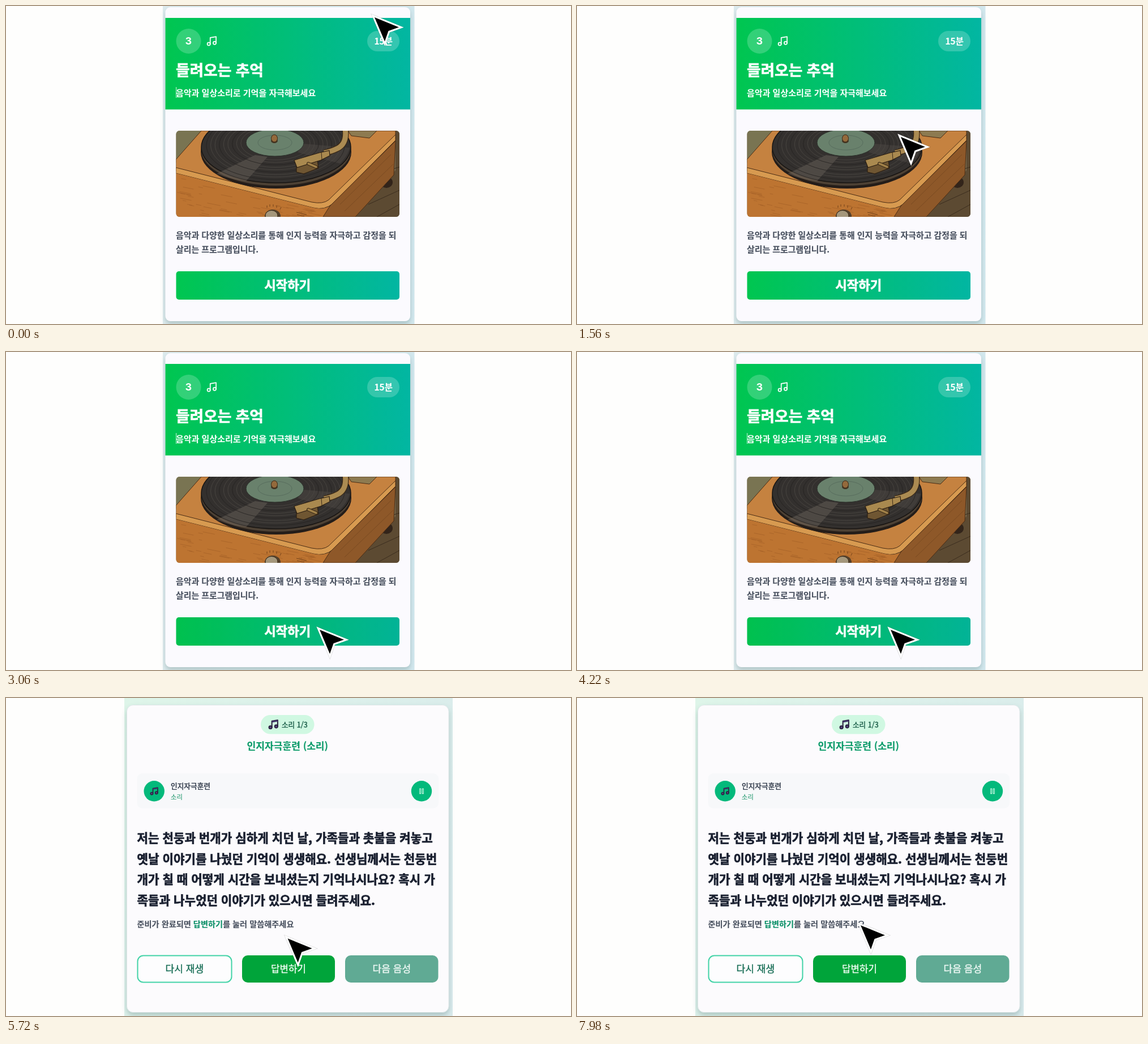
An HTML page for the animation above (8000 ms loop, 998 px wide and 561 px high).

```html
<!DOCTYPE html>
<html lang="ko">
<head>
<meta charset="utf-8">
<title>인지자극훈련</title>
<style>
html, body { margin: 0; width: 100%; height: 100%; overflow: hidden; background: #fefefd; }
svg { display: block; width: 100vw; height: 100vh; }
text { font-family: "Noto Sans CJK KR", "Noto Sans CJK", "Noto Sans", sans-serif; white-space: pre; }
</style>
</head>
<body>
<svg id="stage" viewBox="0 0 998 561" xmlns="http://www.w3.org/2000/svg"></svg>
<script>
const LOOP = 8000, CUT = 4250, PLAYING = 5400;
const stage = document.getElementById('stage');

// Extra outline for weights the font lacks.
const EMBOLDEN = { 400: 0.2, 500: 0.4, 700: 0.15, 900: 0.7 };

// Text placed by the vertical middle of its Hangul glyphs.
const text = (x, y, size, fill, weight, str, anchor = 'start') =>
  `<text x="${x}" y="${y + size * 0.38}" font-size="${size}" fill="${fill}" stroke="${fill}" stroke-width="${EMBOLDEN[weight]}" font-weight="${weight}" text-anchor="${anchor}">${str}</text>`;
const rect = (x, y, w, h, r, fill, more = '') =>
  `<rect x="${x}" y="${y}" width="${w}" height="${h}" rx="${r}" fill="${fill}" ${more}/>`;
const path = (d, fill, stroke = 'none', width = 1, more = '') =>
  `<path d="${d}" fill="${fill}" stroke="${stroke}" stroke-width="${width}" ${more}/>`;
const oval = (x, y, rx, ry, fill, more = '') =>
  `<ellipse cx="${x}" cy="${y}" rx="${rx}" ry="${ry}" fill="${fill}" ${more}/>`;
const note = (x, y, s, color, fill, width) =>
  `<g transform="translate(${x} ${y}) scale(${s})" fill="${fill}" stroke="${color}" stroke-width="${width}" stroke-linejoin="round" stroke-linecap="round">
    <path d="M9 18V5l12-2v13" fill="none"/><circle cx="6" cy="18" r="3"/><circle cx="18" cy="16" r="3"/></g>`;
const darkNote = (x, y, s) => note(x, y, s, '#2b2340', '#5b4a8c', 2.4) +
  path(`M${x + 9 * s} ${y + 6.5 * s}l${12 * s} ${-2 * s}`, 'none', '#40346a', 3 * s);

function rng(seed) {
  return () => (seed = (seed * 16807) % 2147483647) / 2147483647;
}

function grain() {
  const rnd = rng(41);
  let d = '';
  for (let i = 0; i < 60; i++) {
    const x = 302 + rnd() * 240, top = 300 + (x - 300) * 0.25;
    const y = top + rnd() * (372 - top), len = 5 + rnd() * 20;
    d += `M${x.toFixed(1)} ${y.toFixed(1)}l${len.toFixed(1)} ${(len * 0.2).toFixed(1)}`;
  }
  return path(d, 'none', '#8a4d1d', 0.8, 'opacity=".45"');
}

function turntable() {
  const edge = '#4a2c14';
  let rings = '';
  for (let i = 0; i < 9; i++)
    rings += oval(476, 246 - i * 0.5, 122 - i * 7.6, 60 - i * 3.8, 'none', `stroke="${i % 3 ? '#4d4945' : '#242120'}" stroke-width=".8"`);
  return `<g clip-path="url(#photo)">` +
    rect(300, 220, 395, 152, 0, '#77694c') +
    path('M300 220H352L300 277Z', '#797452') +
    path('M688 220H695V372H610L688 290Z', '#5c4a32') +
    path('M640 350L695 325M655 372L695 350M675 290L695 284', 'none', '#3b2d1e', 1) +
    oval(672, 311, 11, 10, '#32241a') +
    path('M345 220H688V235L575 348Q562 358 545 353L300 291V271Z', '#c58240', edge, 1) +
    path('M300 285L540 346Q560 350 570 342L688 227V237L578 348Q563 361 543 356L300 295Z', '#d79a50', edge, 1) +
    path('M300 295L543 356Q560 360 572 353V372H300Z', '#bd7431') +
    path('M572 353L688 238L685 298L617 372H560Z', '#8e5829', edge, 1) +
    path('M590 350L680 262M598 362L684 279', 'none', '#6d411d', 1, 'opacity=".6"') +
    grain() +
    path('M604 220H655L642 233L610 229Z', '#8d7a50', edge, 1) +
    oval(477, 258, 133, 64, '#241d19') +
    oval(477, 254, 132, 63, '#4d4134') +
    oval(477, 249, 132, 63, '#33302e', 'stroke="#171412" stroke-width="1.5"') +
    path('M440 263L372 296Q396 306 424 309L462 266Z', '#8b8378', 'none', 0, 'opacity=".3"') +
    path('M515 258L590 278Q604 264 607 250L526 243Z', '#8b8378', 'none', 0, 'opacity=".15"') +
    rings +
    oval(475, 241, 51, 24, '#69816c', 'stroke="#2c312b"') +
    oval(475, 241, 30, 13, 'none', 'stroke="#53685a" stroke-width=".8"') +
    oval(474, 238, 6, 4, '#443725') +
    oval(474, 233.5, 5.5, 6.5, '#946a3c', 'stroke="#3a2614"') +
    ['#3b2a18', '#ab8b52'].map((c, i) =>
      path('M599 216Q603 242 586 251Q574 257 562 259', 'none', c, i ? 9 : 11.5)).join('') +
    path('M513 280L550 272L552 286L526 296L513 293Z', '#6f5632', '#2b1e12', 1.2) +
    path('M509 272L553 259L571 255L572 264L556 272L514 285Z', '#a9894f', '#2b1e12', 1.2) +
    path('M557 258L558 271', 'none', '#3b2a18', 1) +
    path('M534 278L548 284', 'none', '#3b2a18', 6, 'stroke-linecap="round"') +
    path('M534 278L548 284', 'none', '#a08048', 3.6, 'stroke-linecap="round"') +
    path('M461 356v-4M466 354v-4M472 354v-4M478 356v-4M484 359l2-4', 'none', '#75431a', 1) +
    path('M513 364l18 4M514 368l13 3', 'none', '#75431a', 1) +
    oval(471, 371, 14, 12, '#54402a') +
    oval(469, 370, 11, 9.5, '#a4977c', 'stroke="#392918"') +
    `</g>`;
}

function menuCard() {
  const dark = '#49515f';
  return rect(277, 0, 444.5, 561, 0, 'url(#strip1)') +
    rect(281.5, 2, 432.5, 554, 9, '#fbfafe', 'filter="url(#soft)"') +
    rect(281.5, 21, 432.5, 161.5, 0, 'url(#green)') +
    `<circle cx="322.5" cy="62" r="22" fill="#fff" opacity=".2"/>` +
    `<text x="322.3" y="68.3" font-size="18" font-weight="700" fill="#fff" text-anchor="middle" style="font-family:Inter,sans-serif">3</text>` +
    note(353, 51.5, 0.86, '#fff', 'none', 2) +
    rect(638, 44, 57, 36, 18, '#fff', 'opacity=".2"') +
    text(666.7, 62.3, 15.4, '#fff', 700, '15분', 'middle') +
    text(300, 113, 26.7, '#fff', 900, '들려오는 추억') +
    text(300, 153, 15, '#f3fff8', 700, '음악과 일상소리로 기억을 자극해보세요') +
    `<path id="caret" d="M300.7 143V162" stroke="#d5f5e4" stroke-width="1"/>` +
    turntable() +
    text(300, 404.5, 14.9, dark, 700, '음악과 다양한 일상소리를 통해 인지 능력을 자극하고 감정을 되') +
    text(300, 429.5, 14.9, dark, 700, '살리는 프로그램입니다.') +
    rect(300.5, 468, 394.5, 50, 5, 'url(#green)') +
    rect(300.5, 468, 394.5, 50, 5, '#009a45', 'id="startHover" opacity=".12"') +
    text(497.3, 493, 22.3, '#fff', 900, '시작하기', 'middle');
}

function trainingCard() {
  const lines = [
    '저는 천둥과 번개가 심하게 치던 날, 가족들과 촛불을 켜놓고',
    '옛날 이야기를 나눴던 기억이 생생해요. 선생님께서는 천둥번',
    '개가 칠 때 어떻게 시간을 보내셨는지 기억나시나요? 혹시 가',
    '족들과 나누었던 이야기가 있으시면 들려주세요.'
  ];
  return rect(209, 0, 580, 561, 0, 'url(#strip2)') +
    rect(213.5, 12.5, 568.5, 542, 11, '#fcfbfd', 'filter="url(#soft)" stroke="#dfe7e8" stroke-width="1"') +
    rect(450, 30, 94.5, 33.5, 16.75, '#d0f8e2') +
    darkNote(462, 36.5, 0.85) +
    text(487, 47.3, 12.6, '#1c5f4a', 500, '소리 1/3') +
    text(497.3, 85, 17.1, '#0b9b69', 700, '인지자극훈련 (소리)', 'middle') +
    rect(231.5, 133, 532.5, 61.5, 9, '#f7f8fa') +
    `<circle cx="261.7" cy="164.3" r="18.2" fill="#04b97b"/>` + darkNote(253.2, 156, 0.7) +
    text(291, 155.3, 12.7, '#263040', 500, '인지자극훈련') +
    text(291, 174.5, 11.3, '#38a27d', 400, '소리') +
    `<circle cx="734" cy="164.3" r="18.2" fill="#04b97b"/>` +
    path('M730.5 159.8L738.6 164.3L730.5 168.8Z', 'none', '#dcfff0', 1.2, 'id="play" stroke-linejoin="round"') +
    path('M730.7 160h2v8.6h-2zM735.3 160h2v8.6h-2z', 'none', '#c8f7e3', 1.1, 'id="pause"') +
    lines.map((s, i) => text(231.5, 247 + i * 36.6, 21.2, '#1a2030', 900, s)).join('') +
    text(231.5, 398.5, 14.2, '#4a5260', 700,
      '준비가 완료되면 <tspan fill="#0b9068" stroke="#0b9068">답변하기</tspan>를 눌러 말씀해주세요') +
    rect(232.5, 454.5, 166, 47, 10, '#fdfdfe', 'stroke="#43d3a7" stroke-width="2"') +
    text(315.3, 477.7, 17.1, '#1d715a', 500, '다시 재생', 'middle') +
    rect(417, 454, 164, 48, 10, '#00a43a', 'id="answer"') +
    text(499, 477.7, 16.8, '#f2fff5', 500, '답변하기', 'middle') +
    rect(599, 454, 164.5, 48, 10, '#60aa94') +
    text(681.3, 477.7, 17.1, '#edf8f4', 500, '다음 음성', 'middle');
}

const linear = (id, a, b, more = '') =>
  `<linearGradient id="${id}" ${more}><stop stop-color="${a}"/><stop offset="1" stop-color="${b}"/></linearGradient>`;
const arrow = 'M5 6L48 23.5L29.5 30L23 48.5Z';

stage.innerHTML = `<defs>
  ${linear('green', '#00c650', '#02b6a2')}
  ${linear('strip1', '#deebee', '#d3e8ee')}
  ${linear('strip2', '#def5e9', '#d9eaec', 'x2="1" y2=".6"')}
  <clipPath id="photo"><rect x="300.5" y="220" width="394.5" height="152" rx="6"/></clipPath>
  <filter id="soft" x="-10%" y="-10%" width="120%" height="120%">
    <feDropShadow dx="0" dy="5" stdDeviation="4" flood-color="#4a7068" flood-opacity=".3"/></filter>
  </defs>` +
  rect(0, 0, 998, 561, 0, '#fefefd') +
  `<g id="menu">${menuCard()}</g><g id="training">${trainingCard()}</g>` +
  `<g id="cursor">${path(arrow, 'none', '#000', 7.4, 'opacity=".14"')}${path(arrow, '#000', '#fff', 6.2, 'paint-order="stroke"')}</g>`;

// time, x, y of the pointer
const keys = [
  [0, 646, 14], [960, 599, 77], [2220, 546, 401], [2900, 549, 484], [4250, 549, 484],
  [4750, 484, 478], [5200, 484, 478], [6000, 496, 395], [LOOP, 496, 395]
];

function slope(i, c) {
  const a = keys[i - 1], p = keys[i], b = keys[i + 1];
  if (!a || !b || (p[c] - a[c]) * (b[c] - p[c]) <= 0) return 0;
  return (b[c] - a[c]) / (b[0] - a[0]);
}

function track(t, c) {
  const i = Math.max(0, keys.findIndex(k => k[0] > t) - 1);
  const a = keys[i], b = keys[i + 1], d = b[0] - a[0], u = (t - a[0]) / d;
  const s = u * u * (3 - 2 * u);
  return a[c] + (b[c] - a[c]) * s +
    d * u * (1 - u) * (slope(i, c) * (1 - u) - slope(i + 1, c) * u);
}

const el = id => document.getElementById(id);
const show = (id, on) => el(id).setAttribute('visibility', on ? 'inherit' : 'hidden');

function draw(t) {
  const x = track(t, 1), y = track(t, 2), blink = t % 1060;
  show('menu', t < CUT);
  show('training', t >= CUT);
  show('caret', blink < 50 || blink >= 580);
  show('startHover', y > 463);
  show('play', t < PLAYING);
  show('pause', t >= PLAYING);
  el('answer').setAttribute('fill', y > 449 && x < 576 ? '#009932' : '#00a43a');
  el('cursor').setAttribute('transform', `translate(${x.toFixed(2)} ${y.toFixed(2)})`);
}

const start = performance.now();
function tick() {
  draw((performance.now() - start) % LOOP);
  requestAnimationFrame(tick);
}
tick();
</script>
</body>
</html>
```
